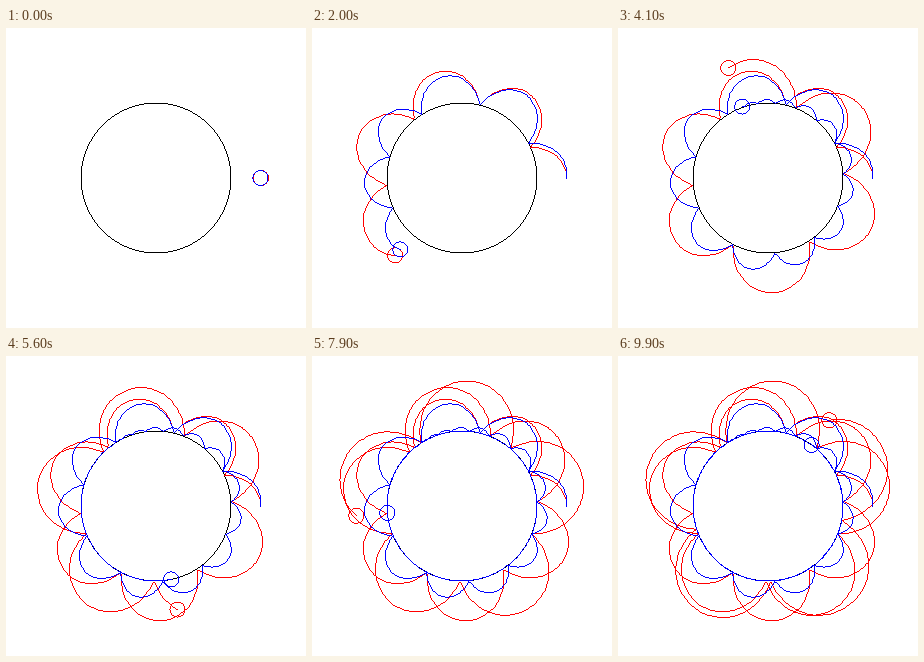
An HTML page with a canvas that plays this animation: 300x300 px, repeating every 10 s.

```html
<!DOCTYPE html>
<html lang="en">
<head>
<meta charset="utf-8">
<title>Bouncing around a planet</title>
<style>
html, body { margin: 0; width: 100%; height: 100%; overflow: hidden; background: #fff; }
canvas { display: block; width: 300px; height: 300px; image-rendering: pixelated; }
</style>
</head>
<body>
<canvas id="stage" width="300" height="300"></canvas>
<script>
const ctx = document.getElementById('stage').getContext('2d');
const C = 150, R = 75, BALL = 7.5;
const RAD = Math.PI / 180;
const GM = 9.81 * 4 * 15 * R * R;   // inverse-square pull, px^3 per rad^2
const FRAME = 100, FRAMES = 100, TURN = 0.2, SUB = 10;

// Angles in degrees at which each ball touches the ground;
// the first flight of each begins at its apex.
const redHits = [-24.4, 24.2, 76, 129, 185.3, 242.4, 303, 363.6, 427.7, 494.3,
  561.5, 628.5, 698.2, 770, 843, 918, 992, 1069, 1146.5];
const blueHits = [-21, 27.6, 76, 122.4, 163.7, 203.5, 242, 275.4, 308, 338, 363,
  387.6, 410, 429, 444.7, 457.6, 468, 476, 482, 486, 488];

function bisect(lo, hi, fn, goal) {
  for (let i = 0; i < 36; i++) {
    const mid = (lo + hi) / 2;
    if (fn(mid) < goal) lo = mid; else hi = mid;
  }
  return (lo + hi) / 2;
}

const swing = e => e + Math.sin(e) * Math.cos(e);
const fallRate = top => Math.sqrt(top ** 3 / (2 * GM));
const fallTime = top => fallRate(top) * swing(Math.acos(Math.sqrt(R / top)));

// Distance from the centre during one flight, symmetric about its apex.
function makeFlight(from, to) {
  const half = (to - from) / 2 * RAD;
  const apex = (from + to) / 2 * RAD;
  const top = bisect(R, 2 * R, fallTime, half);
  return {
    end: to * RAD,
    radius(a) {
      const e = bisect(0, 1.5, swing, Math.abs(a - apex) / fallRate(top));
      return Math.max(R, top * Math.cos(e) ** 2);
    }
  };
}

function makePath(hits) {
  const flights = hits.slice(1).map((h, i) => makeFlight(hits[i], h));
  const path = [];
  for (let i = 0; i <= FRAMES * SUB; i++) {
    const a = i * TURN / SUB;
    const flight = flights.find(f => a <= f.end);
    const r = flight ? flight.radius(a) : R;
    path.push([C + r * Math.cos(a), C - r * Math.sin(a)]);
  }
  return path;
}

const balls = [
  { color: '#f00', path: makePath(redHits) },
  { color: '#00f', path: makePath(blueHits) }
];

const dot = (x, y) => ctx.fillRect(Math.floor(x), Math.floor(y), 1, 1);

function line(x, y, x1, y1) {
  const dx = Math.abs(x1 - x), dy = -Math.abs(y1 - y);
  const sx = Math.sign(x1 - x), sy = Math.sign(y1 - y);
  let err = dx + dy;
  while (true) {
    dot(x, y);
    if (x === x1 && y === y1) return;
    const e2 = 2 * err;
    if (e2 >= dy) { err += dy; x += sx; }
    if (e2 <= dx) { err += dx; y += sy; }
  }
}

// Offsets through pixel centres where the circle is flatter than 45 degrees.
function flatPart(c, r, plot) {
  const reach = r * Math.SQRT1_2 + 0.5;
  for (let p = Math.floor(c - reach); p <= c + reach; p++) {
    const off = p + 0.5 - c;
    if (Math.abs(off) <= reach) plot(p, Math.sqrt(r * r - off * off));
  }
}

function ring(x, y, r) {
  flatPart(x, r, (px, d) => { dot(px, y - d); dot(px, y + d); });
  flatPart(y, r, (py, d) => { dot(x - d, py); dot(x + d, py); });
}

function trail(path, count) {
  for (let i = 1; i <= count; i++) {
    line(...path[i - 1].map(Math.floor), ...path[i].map(Math.floor));
  }
}

function draw(n) {
  ctx.fillStyle = '#fff';
  ctx.fillRect(0, 0, 300, 300);
  ctx.fillStyle = '#000';
  ring(C, C, R);
  for (const { color, path } of balls) {
    ctx.fillStyle = color;
    trail(path, n * SUB);
    ring(...path[n * SUB], BALL);
  }
}

const start = performance.now();
let shown = -1;
function tick(now) {
  const n = Math.floor(Math.max(0, now - start) / FRAME) % FRAMES;
  if (n !== shown) draw(shown = n);
  requestAnimationFrame(tick);
}
draw(shown = 0);
requestAnimationFrame(tick);
</script>
</body>
</html>
```
